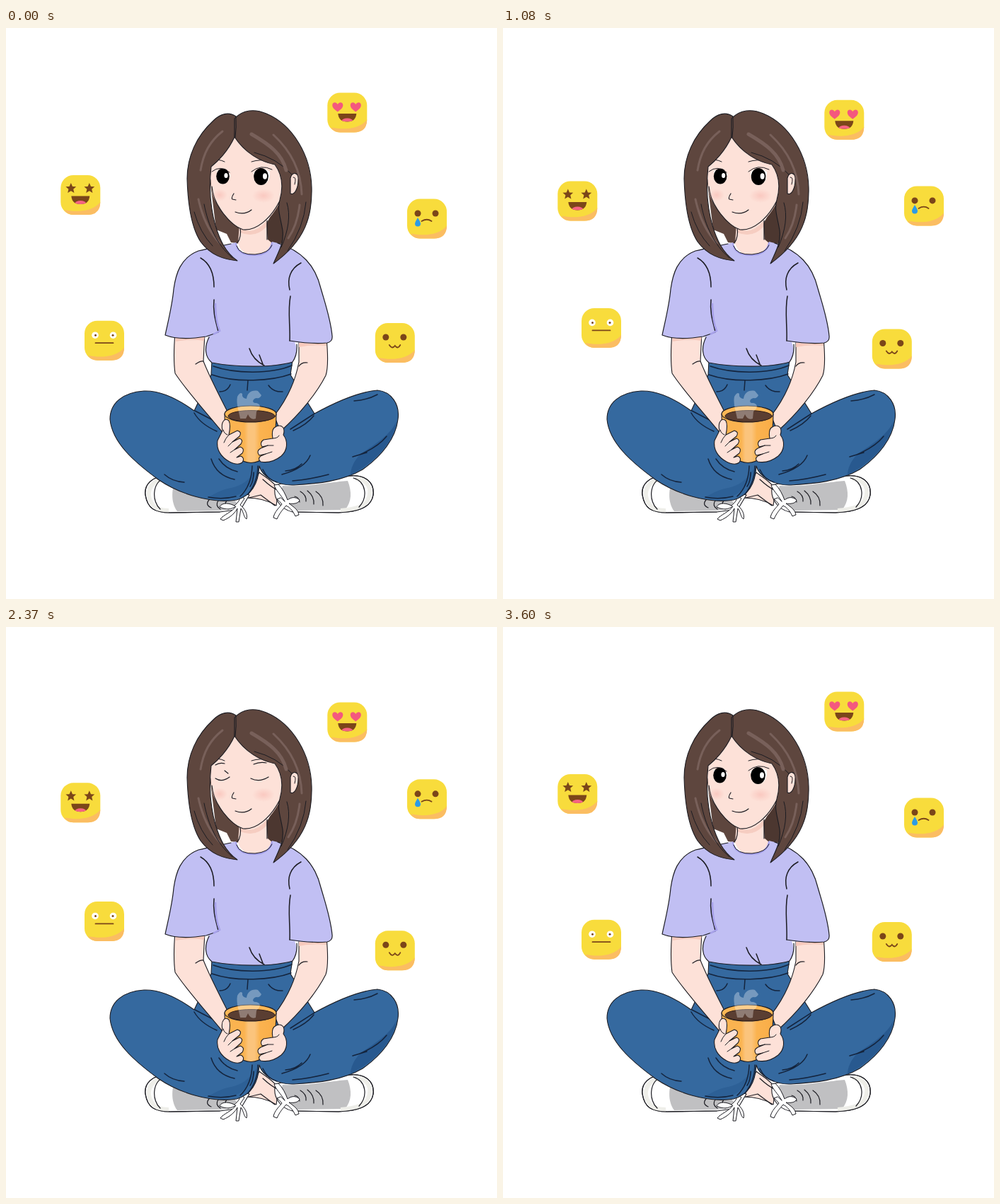
An HTML page for the animation above (3.63 s loop, 694 by 807 pixels).

```html
<!DOCTYPE html>
<html lang="en">
<head>
<meta charset="utf-8">
<title>Coffee and moods</title>
<style>
html, body { margin: 0; width: 100%; height: 100%; overflow: hidden; background: #fff; }
svg { display: block; }
.line { fill: none; stroke: #1c1c22; stroke-width: 1.2; stroke-linecap: round; stroke-linejoin: round; }
.edge { stroke: #1c1c22; stroke-width: 1.1; stroke-linejoin: round; stroke-linecap: round; }
.skin { fill: #fde1d8; }
.hair { fill: #5e463e; }
.dark { fill: #4c3730; }
.shirt { fill: #c1bff3; }
.denim { fill: #35699f; }
.fold { stroke: #14243d; stroke-width: 1.5; }
.thin { stroke-width: 1; }
.shine { fill: none; stroke: #78605a; stroke-width: 3; stroke-linecap: round; }
.brown { fill: #7b4619; }
.stroke { fill: none; stroke: #7b4619; stroke-width: 1.8; stroke-linecap: round; }
</style>
</head>
<body>
<svg width="694" height="807" viewBox="0 0 694 807">
  <defs>
    <radialGradient id="blush"><stop offset="0" stop-color="#f7b5ad" stop-opacity=".55"/><stop offset="1" stop-color="#f7b5ad" stop-opacity="0"/></radialGradient>
    <linearGradient id="mug"><stop offset="0" stop-color="#fbb350"/><stop offset=".38" stop-color="#fbb350"/><stop offset=".46" stop-color="#fbc47c"/><stop offset=".58" stop-color="#fbc47c"/><stop offset=".68" stop-color="#fbb350"/><stop offset="1" stop-color="#f9ad47"/></linearGradient>
    <clipPath id="grin"><path d="M15 29H41Q41 41 28 41Q15 41 15 29Z"/></clipPath>
    <g id="tile">
      <rect width="56" height="56" rx="18" fill="#f8dc3c"/>
      <path d="M5 49C24 53 46 51 56 38Q56 56 38 56H18Q9 56 5 49Z" fill="#fbbd62"/>
    </g>
    <g id="laugh">
      <path class="brown" d="M15 29.500H41Q40 41 28 41Q16 41 15 29.500Z"/>
      <ellipse cx="28" cy="40" rx="8" ry="4" fill="#f56482" clip-path="url(#grin)"/>
    </g>
    <path id="star" class="brown" d="M0-7.5L2.2-2.5L7.4-2.2L3.4 1.3L4.6 6.6L0 3.8L-4.6 6.6L-3.4 1.3L-7.4-2.2L-2.2-2.5Z"/>
    <path id="heart" fill="#f4587e" d="M0 7C-4 4-8 1-7.5-3C-7-7-2-7.5 0-3.5C2-7.5 7-7 7.5-3C8 1 4 4 0 7Z"/>
  </defs>

  <!-- shoes and ankles -->
  <g class="edge">
    <path class="skin" d="M358 628C365 634 379 641 385 652L382 675C368 666 355 664 340 664Z"/>
    <path fill="#fff" d="M228 633C207 633 195 645 197 660C200 679 210 685 232 685L302 684L332 680L344 660L300 650Z"/>
    <path fill="#fff" d="M486 633C509 631 521 643 519 660C516 679 495 684 470 685L405 684C388 680 376 664 381 646L405 640Z"/>
  </g>
  <path fill="#c0c0c2" d="M237 646C255 654 284 664 322 666L330 676L304 682L242 683C234 672 234 658 237 646Z"/>
  <path fill="#c0c0c2" d="M391 647C425 649 455 642 483 640C489 655 489 670 479 681L412 682C396 673 386 660 391 647Z"/>
  <g fill="none" stroke="#eeeee9" stroke-width="6">
    <path d="M222 637C203 641 197 658 206 672C211 680 220 682 230 682"/>
    <path d="M494 637C512 638 518 652 512 666C507 678 490 681 473 682"/>
  </g>
  <g class="line">
    <path d="M224 636C206 643 206 669 218 680M491 636C509 641 512 663 499 677M228 633C207 633 195 645 197 660C200 679 210 685 232 685L302 684M486 633C509 631 521 643 519 660C516 679 495 684 470 685L410 684"/>
    <path d="M287 667Q281 674 290 678M300 668Q295 675 303 680M312 668Q307 674 314 680M416 655Q425 660 424 669M426 654Q436 662 435 673M438 655Q449 662 448 675M408 662Q414 663 415 670"/>
    <path d="M343 664L360 660L380 675M363 638Q376 650 384 653"/>
  </g>
  <g class="edge thin" fill="#fff">
    <path d="M323 675C311 669 303 673 302 677C312 682 319 680 325 676C320 684 307 688 303 694L307 696C317 692 324 685 327 679L325 698L329 698L332 679C336 684 336 692 340 694C342 686 337 679 331 674L337 665L330 660C332 667 328 670 323 675Z"/>
    <path d="M394 669C388 659 381 653 379 646L385 645C391 651 395 659 398 667C403 663 409 662 415 667C414 672 406 673 400 672C407 677 413 681 414 688L409 690C405 681 400 677 396 675C391 681 387 685 383 694L378 692C379 684 387 677 390 673Q386 668 383 666L388 664Z"/>
  </g>

  <!-- jeans -->
  <g class="edge denim">
    <path d="M291 470L290 490L266 541C244 525 220 512 195 513C165 515 147 530 147 553C150 586 181 613 215 638C244 658 290 673 326 667C350 660 357 640 358 619C362 635 386 647 407 646C440 644 475 641 504 624C531 605 551 580 554 553C557 532 545 514 525 512C500 514 467 528 436 545L402 490L405 470Z"/>
  </g>
  <path d="M552 556C541 579 516 591 500 603C492 612 487 622 487 632L504 622C531 603 550 579 552 556Z" fill="#28598f"/>
  <path d="M284 664C319 670 343 661 355 622C345 638 334 647 318 650C302 653 294 659 284 664Z" fill="#2d6096"/>
  <g class="line fold">
    <path d="M293 478C324 489 375 489 404 477M291 490C325 502 376 499 403 489M302 514Q313 514 317 504M371 505Q378 515 391 514M342 498L341 512"/>
    <path d="M267 541L292 554M266 544Q275 560 298 570M290 609C294 622 304 634 323 638M301 609Q310 623 327 627M224 631Q235 641 252 642M331 662Q347 647 348 619M286 663Q306 667 325 662M356 619Q356 641 342 659M350 628Q350 641 345 648"/>
    <path d="M436 545L402 567M435 548Q426 560 406 569M430 604Q423 622 390 631M418 616Q409 625 395 626M456 631Q430 638 405 640M500 603Q526 592 538 577M490 606L510 600M363 624Q370 639 383 642M492 527Q510 526 525 518"/>
  </g>

  <!-- back hair, neck -->
  <path class="hair" d="M288 212L297 285L312 291L318 303L333 305L332 278L318 250Z"/>
  <path class="dark" d="M392 215L380 256L368 276L370 303Q384 309 394 302L408 262L405 228Z"/>
  <path class="skin" d="M330 276L328 304Q332 321 352 321Q372 318 376 304L369 298L368 270Z"/>
  <path d="M331 283Q351 294 369 272L368 281Q352 298 331 289Z" fill="#f6cdc1"/>
  <path class="line" d="M331 281Q333 296 327 304M369 272L369 299"/>

  <!-- arms -->
  <g class="skin edge">
    <path d="M239 430C237 455 237 474 239 488C253 510 281 541 309 575L315 546C300 517 287 491 279 471L281 430Z"/>
    <path d="M414 438L414 472C409 500 397 525 379 548L388 570C416 545 440 515 452 491C456 479 455 460 453 438Z"/>
  </g>
  <path d="M240 437L281 434L280 442Q260 439 240 443ZM414 445L453 443V449Q432 447 414 451Z" fill="#f7c9bc"/>
  <path class="line" d="M268 475Q275 470 279 471M414 478Q418 472 426 473"/>

  <!-- shirt -->
  <path class="shirt" d="M325 303C310 307 291 310 272 315C246 325 240 348 237 369C235 392 229 415 225 434Q245 442 283 436L287 436C280 451 281 465 291 473C326 480 379 480 405 472C412 462 412 453 408 444Q432 447 454 445Q462 443 461 435C459 412 451 389 445 368C437 335 418 315 384 304L376 302C374 315 363 321 350 321C335 321 326 315 325 303Z"/>
  <path class="line" d="M318 305C300 309 288 311 272 315C246 325 240 348 237 369C235 392 229 415 225 434Q245 442 283 436L300 430M384 304C418 315 437 335 445 368C451 389 459 412 461 435Q462 443 454 445Q432 447 401 442M287 437C280 451 281 465 291 473C326 480 379 480 405 472Q412 462 411 447"/>
  <path class="line" style="stroke-width:1.5" d="M275 325C289 333 294 348 294 366M294 384C292 402 297 416 300 429M417 332C402 340 397 354 401 370M402 379C398 400 402 420 401 442M344 453Q349 469 365 477M358 462L363 475"/>
  <path d="M296 389Q296 414 302 428L293 433" fill="none" stroke="#a6a0e9" stroke-width="2.5"/>
  <path d="M325 304C326 316 336 321 350 321C365 321 374 315 376 303" fill="none" stroke="#a29de8" stroke-width="2"/>
  <path class="line thin" d="M326 308Q330 321 352 320Q372 318 376 307"/>

  <!-- face -->
  <path class="skin" d="M323 154L288 199L291 232C296 251 317 278 335 285C354 288 376 270 387 246L396 220L380 178Z"/>
  <path class="line" d="M291 224C293 250 317 279 335 285C354 287 374 269 386 246"/>
  <ellipse cx="302" cy="236" rx="11" ry="9" fill="url(#blush)"/>
  <ellipse cx="364" cy="237" rx="16" ry="10" fill="url(#blush)"/>
  <path class="line" d="M322 234Q318 240 320 242L325 243M324 260Q337 265 347 257"/>
  <path class="line thin" d="M290 188Q299 184 309 189M347 189Q359 185 374 188"/>
  <g id="open">
    <path d="M298 203Q306 195 317 207Q314 222 304 220Q298 215 298 203ZM350 204Q360 194 373 203Q373 222 359 222Q350 218 350 204Z" fill="#fff"/>
    <g id="pupils">
      <ellipse cx="306.500" cy="209.500" rx="9.300" ry="11"/>
      <ellipse cx="360.500" cy="210" rx="10.300" ry="12"/>
      <ellipse cx="311" cy="208.500" rx="2.600" ry="3.600" fill="#fff"/>
      <ellipse cx="366" cy="209.500" rx="3" ry="4.200" fill="#fff"/>
    </g>
    <path class="line thin" d="M291 203Q303 193 316 204M347 203Q360 192 376 200"/>
  </g>
  <g id="shut" class="line" display="none">
    <path d="M296 214Q305 220 316 212M346 214Q358 220 371 212M309 203L314 207M296 195Q302 191 309 193M350 194Q359 190 368 192"/>
  </g>

  <!-- hair -->
  <g class="hair edge">
    <path d="M325 125C315 118 303 121 293 131C269 153 256 182 256 213C257 249 262 282 275 302C289 321 307 327 327 329C310 317 302 299 296 279C288 251 287 223 290 196C299 189 314 174 323 154Z"/>
    <path d="M323 128C335 115 352 114 368 121C406 137 431 181 432 225C433 265 424 300 378 333C385 316 393 305 391 286C388 268 383 256 387 243C392 225 391 208 380 193C360 189 338 177 323 154Z"/>
  </g>
  <path class="skin edge" d="M402 212C405 202 414 204 413 215C413 226 408 237 402 234Z"/>
  <path class="line thin" d="M406 211Q411 210 408 221M404 207Q383 184 351 176M324 155Q326 140 325 125"/>
  <g class="shine">
    <path d="M306 146C288 160 279 177 275 201"/>
    <path d="M347 150C371 164 390 177 396 201" style="stroke-width:5"/>
    <path d="M378 151C403 174 417 202 418 235M415 250Q412 278 399 297"/>
    <path d="M272 242C278 270 288 289 302 304"/>
  </g>
  <path class="line thin" d="M280 249C286 280 298 306 320 325M266 260Q274 289 292 308M397 247Q405 273 389 310M424 246Q421 282 398 315"/>

  <!-- mug -->
  <path class="edge" fill="url(#mug)" d="M309 545C309 570 314 592 325 605Q346 624 368 605C378 592 382 570 382 545Z"/>
  <ellipse class="edge" cx="345.500" cy="545.500" rx="36.500" ry="11.500" fill="#fbb755"/>
  <ellipse cx="347" cy="548.500" rx="33" ry="8" fill="#5a3e32" stroke="#332019"/>
  <path id="steam" fill="#fff" fill-opacity=".32" fill-rule="evenodd"/>

  <!-- hands -->
  <g class="skin edge">
    <path d="M306 569C303 556 310 550 315 555Q318 561 315 575L327 569Q334 571 330 577L320 585L330 580Q336 582 332 588L323 596L331 592Q338 594 334 601L326 607L332 605Q338 608 334 614Q328 619 316 613C303 606 297 595 299 583Z"/>
    <path d="M392 575C399 584 398 597 389 605Q375 616 360 613Q355 609 360 605L367 602L358 604Q353 598 360 594L370 590L362 592Q358 586 364 582L377 580Q375 569 379 565Q387 559 392 565Q394 570 392 575Z"/>
  </g>
  <path class="line thin" d="M315 575Q310 580 308 586M320 585L314 591M323 596L317 600M377 580Q384 580 386 576M370 590L378 590M367 602L376 599M307 568Q308 573 313 575"/>

  <g id="moods">
    <g><use href="#tile"/><use href="#star" x="14.500" y="18.500"/><use href="#star" x="40.500" y="18.500"/><use href="#laugh"/></g>
    <g><use href="#tile"/><use href="#heart" x="14.500" y="20"/><use href="#heart" x="40" y="20"/><use href="#laugh"/></g>
    <g><use href="#tile"/><g class="brown"><circle cx="15" cy="20.500" r="4.500"/><circle cx="40" cy="20.500" r="4.500"/></g>
      <path class="stroke" d="M20.500 31.500Q28 27 34.500 31.500"/><path d="M15 26.500Q11 33 11 35A4 4 0 0 0 19 35Q19 33 15 26.500Z" fill="#2c9be6"/></g>
    <g><use href="#tile"/><g fill="#fff"><circle cx="15" cy="20.500" r="4.800"/><circle cx="40.500" cy="20.500" r="4.800"/></g>
      <g class="brown"><circle cx="15.500" cy="20.500" r="1.500"/><circle cx="40" cy="20.500" r="1.500"/></g><path class="stroke" d="M15.500 31.500H40.500"/></g>
    <g><use href="#tile"/><g class="brown"><circle cx="15" cy="20" r="4.500"/><circle cx="40" cy="20" r="4.500"/></g>
      <path class="stroke" d="M20 31Q24 37.500 28 32Q32 37.500 35.500 31"/></g>
  </g>
</svg>
<script>
const LOOP = 3630, PUFF = 660;
const el = id => document.getElementById(id);

// time, share of the full drift
const drift = [[0, 0], [250, .04], [540, .17], [710, .29], [1110, .55], [1440, .78], [1640, .89],
  [1900, 1], [2100, 1], [2370, .77], [2690, .5], [2810, .41], [3240, .14], [3600, 0], [LOOP, 0]];

// x, y, distance travelled
const spots = [[77.3, 208, 16], [454.3, 91.5, 19.5], [567, 241.5, -34], [111, 413.7, -33.5], [521.8, 417, 16]];

const drop = 'M323 521L328 518Q329 526 324 527Z';
const tall = 'M331 552C329 541 325 531 327 521Q331 514 334 517Q333 523 340 524C341 516 347 511 356 513L361 519Q359 524 354 523C348 524 347 531 354 530Q361 532 358 538L354 542L353 552Q346 555 342 546L339 552Z';
const wisp = drop + 'M338 520C343 514 352 514 360 517Q368 524 361 531L355 535Q358 527 350 524Q345 532 336 528L345 525ZM330 551C326 536 337 533 346 535Q361 531 365 540L362 550L357 544L353 549L348 543L343 551L338 544Z';
const curl = drop + 'M344 514C353 510 365 518 363 527C361 535 354 533 353 538Q367 536 365 547L360 552L356 543L351 551L347 543L341 553L337 546L331 552C326 537 336 530 347 529Q338 527 334 531Q333 522 341 520L348 524Z';
const hook = 'M325 517L329 515L330 520ZM332 551C329 536 334 524 343 521Q345 513 354 514L361 519Q362 530 355 532Q347 534 356 538Q364 544 355 552L349 545L344 552L339 547Z';
const puffs = [[0, tall], [30, wisp], [90, curl], [150, hook], [230, tall]];

const moods = [...el('moods').children];

function level(t) {
  const i = drift.findIndex(([at]) => at >= t);
  if (i < 1) return drift[0][1];
  const [a, from] = drift[i - 1], [b, to] = drift[i];
  return from + (to - from) * (t - a) / (b - a);
}

function draw(now) {
  const t = now % LOOP, k = level(t);
  moods.forEach((m, i) => {
    const [x, y, d] = spots[i];
    m.setAttribute('transform', `translate(${x} ${y + d * k})`);
  });
  const shut = t >= 2250 && t < 2520;
  el('open').setAttribute('display', shut ? 'none' : 'inline');
  el('shut').setAttribute('display', shut ? 'inline' : 'none');
  el('pupils').setAttribute('transform', `translate(${t > 300 && t < 3300 ? .6 : 0} 0)`);
  const phase = t % PUFF;
  el('steam').setAttribute('d', puffs.findLast(([at]) => phase >= at)[1]);
}

const start = performance.now();
function tick() {
  draw(performance.now() - start);
  requestAnimationFrame(tick);
}
tick();
</script>
</body>
</html>
```
